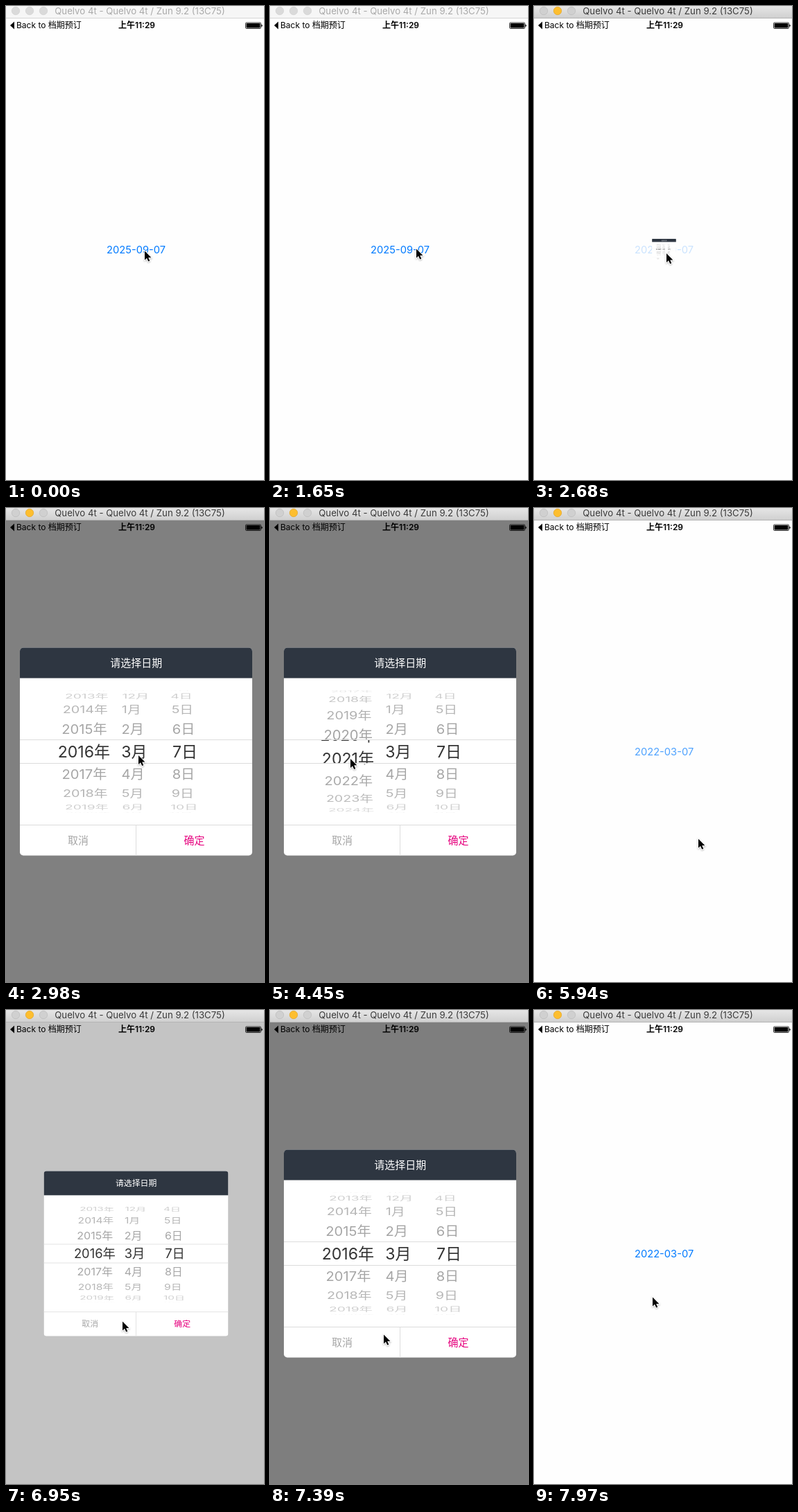
Recreate the animation shown at these times as an HTML page. Size 372x684 px, loop 8 s.

```html
<!DOCTYPE html>
<html lang="zh-CN">
<head>
<meta charset="utf-8">
<title>Date picker</title>
<style>
html, body { margin: 0; width: 100%; height: 100%; overflow: hidden; background: #fefefe; }
svg { display: block; width: 372px; height: 684px; font-family: Inter, "Noto Sans CJK SC", "Noto Sans CJK", sans-serif; }
.mid { text-anchor: middle; }
</style>
</head>
<body>
<svg viewBox="0 0 372 684">
  <defs>
    <linearGradient id="bar" x2="0" y2="1">
      <stop offset="0" stop-color="#e6e6e6"/><stop offset="1" stop-color="#d0d0d0"/>
    </linearGradient>
    <clipPath id="outer"><path d="M20 263H355V334.5H20ZM20 368.5H355V440H20Z"/></clipPath>
    <clipPath id="lens"><rect x="20" y="335" width="335" height="33"/></clipPath>
    <clipPath id="card"><rect x="20" y="201.5" width="335" height="300" rx="5"/></clipPath>
    <filter id="soft" x="-50%" y="-50%" width="200%" height="200%">
      <feDropShadow dx="0" dy="1" stdDeviation=".8" flood-opacity=".35"/>
    </filter>
  </defs>
  <rect width="372" height="684" fill="#fefefe"/>

  <path d="M6 28L12 22.5V33.5Z"/>
  <text x="15" y="32" font-size="12">Back to 档期预订</text>
  <text class="mid" x="188.5" y="32.3" font-size="12" font-weight="600">上午11:29</text>
  <rect x="345.5" y="24" width="22" height="8.5" rx="1.2" fill="none" stroke="#000" stroke-width=".8"/>
  <rect x="346.6" y="25" width="19.8" height="6.5" rx=".5"/>
  <path d="M368.3 26.6q1.4 .3 1.4 1.7t-1.4 1.7Z"/>

  <text id="date" class="mid" x="187.6" y="357" font-size="14.7" fill="#007aff"></text>
  <rect id="dim" y="18" width="372" height="666"/>

  <g id="popup">
    <g clip-path="url(#card)">
      <rect x="20" y="201" width="335" height="301" fill="#fff"/>
      <rect x="20" y="201" width="335" height="44.5" fill="#2e3641"/>
    </g>
    <text class="mid" x="187.7" y="229" font-size="15" fill="#fff">请选择日期</text>
    <g id="wheel" clip-path="url(#outer)"></g>
    <g id="picked" clip-path="url(#lens)" fill="#333"></g>
    <path d="M20 334.5H355M20 368.5H355M20 457.5H355M187.5 458V501.5" stroke="#dcdcdc" fill="none"/>
    <text class="mid" x="104" y="485" font-size="15" fill="#a6a6a6">取消</text>
    <text class="mid" x="271.5" y="485" font-size="15" font-weight="500" fill="#e6007e">确定</text>
  </g>

  <rect id="top" width="372" height="17"/>
  <path id="edge" d="M0 17.5H372"/>
  <g id="dots" stroke-width=".7">
    <circle cx="14" cy="7" r="5.7"/><circle cx="34" cy="7" r="5.7"/><circle cx="54" cy="7" r="5.7"/>
  </g>
  <text id="title" class="mid" x="193" y="12" font-size="13.2">Quelvo 4t - Quelvo 4t / Zun 9.2 (13C75)</text>

  <path id="cursor" d="M0 .5V13.5L3 10.7L5.2 15.6L7.3 14.7L5.2 9.9H9.4Z" stroke="#fff" stroke-width="1.6" paint-order="stroke" filter="url(#soft)"/>
</svg>
<script>
const LOOP = 8000, TICKS = 54;
const CX = 187.5, CY = 351.5, RAD = 88.7, STEP = 21.5 * Math.PI / 180;
const TRAVEL = 400, PRESS = 185, DRAG = 3570, SWING = 740;

// Places where the pointer arrives: time, x, y.
const stops = [
  [0, 200, 353], [150, 193, 356], [740, 211, 350], [2085, 191, 356.5], [DRAG, 116, 395],
  [5450, 260, 480], [5929, 237, 477], [6390, 190, 358], [6951, 168, 449],
  [7250, 164, 468], [7970, 171, 414]
];
const shows = [{ open: 2685, close: 5530 }, { open: 6810, close: 7420 }];
const columns = [
  { x: 112.4, anchor: "middle", label: n => n + "年" },
  { x: 166.3, anchor: "start", label: n => (n + 11) % 12 + 1 + "月" },
  { x: 240, anchor: "start", label: n => n + "日" }
];

const $ = id => document.getElementById(id);
const set = (el, attrs) => {
  for (const name in attrs) el.setAttribute(name, attrs[name]);
};
const span = (t, from, to) => Math.min(1, Math.max(0, (t - from) / (to - from)));
const ease = p => p * p * (3 - 2 * p);

function pointer(t) {
  let [, x, y] = stops[0];
  for (let i = 1; i < stops.length; i++) {
    const [end, tx, ty] = stops[i];
    const p = ease(span(t, Math.max(stops[i - 1][0], end - TRAVEL), end));
    x += (tx - x) * p;
    y += (ty - y) * p;
  }
  // Two flicks up the year wheel.
  const swings = 2 * span(t, DRAG, DRAG + 2 * SWING);
  return [x, y - 47.5 * (1 - Math.cos(2 * Math.PI * swings))];
}

const yearAt = t => t > shows[1].open ? 2016
  : 2016 + 4 * ease(span(t, DRAG, 4250)) + 2 * ease(span(t, 4270, 4745));

function dateAlpha(t) {
  const show = shows.filter(s => t >= s.open - PRESS).pop();
  if (!show) return 1;
  return t < show.close ? .2 : span(t, show.close + 56, show.close + 546);
}

function row(col, n, angle, size, alpha) {
  const cos = Math.cos(angle);
  const near = 900 / (900 + RAD * (1 - cos));
  const x = CX + (col.x - CX) * near, y = CY + RAD * Math.sin(angle);
  return `<text transform="translate(${x} ${y}) scale(${near} ${Math.max(.13, cos)})" y="${size * .364}"` +
    ` font-size="${size}" text-anchor="${col.anchor}" opacity="${alpha}">${col.label(n)}</text>`;
}

function drawWheels(year) {
  let rows = "", lens = "";
  [year, 3, 7].forEach((value, c) => {
    const mid = Math.round(value);
    for (let n = mid - 4; n <= mid + 4; n++) {
      const angle = (n - value) * STEP;
      if (Math.abs(angle) > 1.56) continue;
      rows += row(columns[c], n, angle, 20.3, .37 * Math.cos(angle) ** .8);
      if (Math.abs(n - value) < 1.2) lens += row(columns[c], n, angle, 23.1, 1);
    }
  });
  $("wheel").innerHTML = rows;
  $("picked").innerHTML = lens;
}

function drawPopup(t) {
  const show = shows.find(s => t >= s.open && t < s.close + 250);
  set($("popup"), { display: show ? "inline" : "none" });
  if (!show) return set($("dim"), { opacity: 0 });
  const p = span(t, show.open, show.open + 300), q = span(t, show.close, show.close + 250);
  const scale = (1 - .9 * (1 - p) ** 2.31) * (1 - .9 * q * q);
  set($("dim"), { opacity: .5 * ease(p) * (1 - q) });
  set($("popup"), { transform: `translate(${CX} ${CY}) scale(${scale}) translate(${-CX} ${-CY})` });
  drawWheels(yearAt(t));
}

function drawWindow(active) {
  set($("top"), { fill: active ? "url(#bar)" : "#f6f6f6" });
  set($("edge"), { stroke: active ? "#b4b4b4" : "#d6d6d6" });
  set($("title"), { fill: active ? "#3a3a3a" : "#a9a9a9" });
  const plain = active ? { fill: "#d0d0d0", stroke: "#bababa" } : { fill: "#dadada", stroke: "#d0d0d0" };
  const lit = { fill: "#fdbe2f", stroke: "#e3a423" };
  [...$("dots").children].forEach((dot, i) => set(dot, active && i === 1 ? lit : plain));
}

function render(t) {
  drawWindow(t >= shows[0].open - PRESS);
  $("date").textContent = t < shows[0].close ? "2025-09-07" : "2022-03-07";
  set($("date"), { opacity: dateAlpha(t) });
  drawPopup(t);
  set($("cursor"), { transform: `translate(${pointer(t)})` });
}

// The picture moves in ticks of about 148 ms.
const tick = k => 150 * k - 130 * (k / TICKS) ** 2;
let last = -1;
function loop(now) {
  const t = now % LOOP;
  let k = 0;
  while (k < TICKS && tick(k + 1) - 15 <= t) k++;
  if (k !== last) render(tick(last = k));
  requestAnimationFrame(loop);
}
render(0);
requestAnimationFrame(loop);
</script>
</body>
</html>
```
